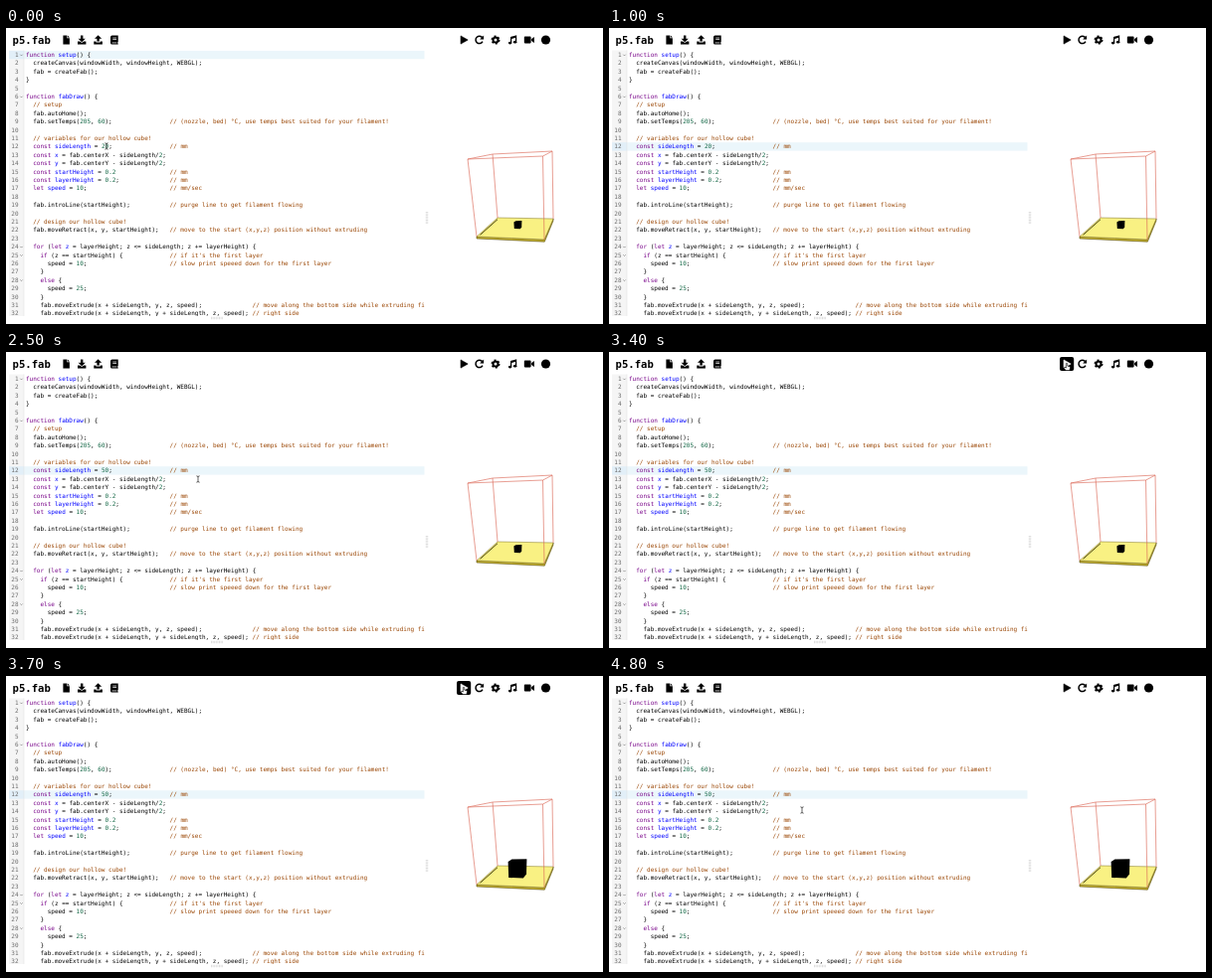
An HTML page that plays this animation: 600 px wide and 298 px high, repeating every 4.9 s.

```html
<!DOCTYPE html>
<html lang="en">
<head>
<meta charset="utf-8">
<title>p5.fab editor</title>
<style>
  html, body { margin: 0; width: 100%; height: 100%; overflow: hidden; background: #fff; }
  svg { display: block; width: 100%; height: 100%; }
  text { white-space: pre; font: 6px "DejaVu Sans Mono", "Liberation Mono", monospace; }
  .title { font-size: 10.6px; font-weight: bold; }
  .num { fill: #6c6c6c; text-anchor: end; }
  .keyword { fill: #708; }
  .def { fill: #00f; }
  .number { fill: #164; }
  .comment { fill: #940; }
  .line { fill: none; stroke: #000; stroke-width: 1.5; }
  .wire { fill: none; stroke: #dc6a58; stroke-width: .65; stroke-linejoin: round; }
</style>
</head>
<body>
<svg viewBox="0 0 600 298">
  <defs>
    <clipPath id="pane"><rect x="3" y="22.5" width="417.5" height="267.5"/></clipPath>
  </defs>

  <text class="title" x="6.6" y="15.5">p5.fab</text>
  <g id="fileIcons">
    <path d="M57.4 7.6h3.9v2.6h2.6v6.2h-6.5zM61.9 7.6l2 2h-2z"/>
    <path d="M75 7.6h2.4v3.2h2.4l-3.6 3.4-3.6-3.4H75zM72 13.4h2.2l2 1.7 2-1.7h2.2v3H72z"/>
    <path d="M91.4 13.6h2.4v-2.9h2.4l-3.6-3.4-3.6 3.4h2.4zM88.3 13.4h2.2v1h4.2v-1h2.2v3h-8.6z"/>
    <path d="M106.6 7.6h6.1v6.6h-.5v1.3h.5v1h-6.1q-1.6 0-1.6-1.6V9.2q0-1.6 1.6-1.6z"/>
    <path d="M107.3 10h3.8M107.3 11.5h3.8M106.6 14.9h4.8" stroke="#fff" stroke-width=".7"/>
  </g>

  <rect id="playBox" x="453" y="5" width="14.2" height="14" rx="2"/>
  <path id="play" d="M457 7.9L464.2 12L457 16.1z" stroke-width=".6" stroke-linejoin="round"/>
  <path class="line" d="M478.8 9.8A3.7 3.7 0 1 0 479 13.7"/>
  <path d="M480.1 7.5v4h-4z"/>
  <g transform="translate(492 12)">
    <circle r="2.5" fill="none" stroke="#000" stroke-width="2"/>
    <circle r="3.7" fill="none" stroke="#000" stroke-width="1.6" stroke-dasharray="1.94"/>
  </g>
  <path d="M507 8.9l6.2-1.7v7.2h-1.2v-4.6l-3.8 1.1v4.4H507z"/>
  <ellipse cx="506.6" cy="15.1" rx="1.7" ry="1.4"/>
  <ellipse cx="511.6" cy="14.2" rx="1.7" ry="1.4"/>
  <path d="M521.6 8.6h5.2q.8 0 .8.8v5.2q0 .8-.8.8h-5.2q-.8 0-.8-.8V9.4q0-.8.8-.8zM528.1 10.9l2.8-1.9v6l-2.8-1.9z"/>
  <circle cx="542.5" cy="12" r="4.6"/>

  <g clip-path="url(#pane)">
    <rect x="3" y="22" width="15" height="270" fill="#f5f5f5"/>
    <g id="active">
      <rect x="3" width="15" height="8.4" fill="#e2eff8"/>
      <rect x="18" width="403" height="8.4" fill="#ebf6fb"/>
    </g>
    <path d="M18 22V291" stroke="#ddd" stroke-width=".5"/>
    <g id="flash" fill="#ff5a00"></g>
    <g id="code"></g>
  </g>
  <path d="M206 291.3h12M206 292.7h12M422.3 185v12M423.7 185v12" stroke="#bbb" stroke-width=".6" stroke-dasharray="1 .6"/>

  <g id="printer">
    <path d="M473 210L541 213L550 192V194L541.3 215.2L473 212z" fill="#c9b52e" stroke="#55490f" stroke-width=".6"/>
    <path d="M473 210L494 191L550 192L541 213z" fill="#f9f183" stroke="#7d7020" stroke-width=".5"/>
    <path d="M476.5 208.3L494 192.7" stroke="#4a4312" stroke-width="1"/>
    <path class="wire" d="M464 132L489 127L549 124L539.5 129zM464 132L473 210M489 127L494 191M549 124L550 192M539.5 129L541 213"/>
    <path id="cube"/>
  </g>

  <g id="cursor">
    <path id="beam" d="M-1.6-3.2Q0-3.2 0-2.2Q0-3.2 1.6-3.2M0-2.4V2.4M-1.6 3.2Q0 3.2 0 2.2Q0 3.2 1.6 3.2" fill="none" stroke="#222" stroke-width=".7"/>
    <path id="arrow" d="M0 0V7L1.6 5.5L2.7 8L3.8 7.5L2.7 5.1H4.9z" stroke="#fff" stroke-width=".5"/>
    <path id="hand" d="M-.7-2.5Q0-3.3.7-2.5V.1L3.1.7Q3.7 1 3.5 2L2.8 4.6H-.9L-3 1.9Q-2.8.9-1.7 1.4L-.7 2z" fill="#fff" stroke="#000" stroke-width=".6"/>
  </g>
</svg>
<script>
const LOOP = 4900, STEP = 100;
const CHAR = 3.612, PITCH = 8.4, LEFT = 20, TOP = 22.8;
const EDIT_LINE = 12;

const byId = id => document.getElementById(id);
const show = (id, on) => byId(id).style.display = on ? "" : "none";
const note = (code, comment, column = 40) => code.padEnd(column) + "// " + comment;

const sideLine = value => note(`  const sideLength = ${value};`, "mm");

const lines = [
  "function setup() {",
  "  createCanvas(windowWidth, windowHeight, WEBGL);",
  "  fab = createFab();",
  "}",
  "",
  "function fabDraw() {",
  "  // setup",
  "  fab.autoHome();",
  note("  fab.setTemps(205, 60);", "(nozzle, bed) °C, use temps best suited for your filament!"),
  "  ",
  "  // variables for our hollow cube!",
  sideLine("20"),
  "  const x = fab.centerX - sideLength/2;",
  "  const y = fab.centerY - sideLength/2;",
  note("  const startHeight = 0.2", "mm"),
  note("  const layerHeight = 0.2;", "mm"),
  note("  let speed = 10;", "mm/sec"),
  "",
  note("  fab.introLine(startHeight);", "purge line to get filament flowing"),
  "",
  "  // design our hollow cube!",
  note("  fab.moveRetract(x, y, startHeight);", "move to the start (x,y,z) position without extruding"),
  "",
  "  for (let z = layerHeight; z <= sideLength; z += layerHeight) {",
  note("    if (z == startHeight) {", "if it's the first layer"),
  note("      speed = 10;", "slow print speeed down for the first layer"),
  "    }",
  "    else {",
  "      speed = 25;",
  "    }",
  note("    fab.moveExtrude(x + sideLength, y, z, speed);", "move along the bottom side while extruding filament", 63),
  note("    fab.moveExtrude(x + sideLength, y + sideLength, z, speed);", "right side", 63)
];

function highlight(source) {
  const token = /(\/\/.*)|\b(function|const|let|for|if|else)\b|\b(\d[\d.]*)|(\w+)|[^\w/]+|\//g;
  let declares = false;
  return source.replace(token, (text, comment, keyword, number, word) => {
    const kind = comment ? "comment" : keyword ? "keyword" : number ? "number" : word && declares ? "def" : "";
    if (text.trim()) declares = /^(function|const|let)$/.test(text);
    const safe = text.replace(/</g, "&lt;");
    return kind ? `<tspan class="${kind}">${safe}</tspan>` : safe;
  });
}

byId("code").innerHTML = lines.map((source, i) => {
  const y = TOP + i * PITCH + 6.2;
  const fold = /^(function|.*(for|if) \(|.*else)/.test(source)
    ? `<path d="M14.3 ${y - 2.3}l1.2 1.2l1.2-1.2" fill="none" stroke="#666" stroke-width=".6"/>` : "";
  return `<text class="num" x="12.6" y="${y}">${i + 1}</text>${fold}` +
    `<text id="line${i + 1}" x="${LEFT}" y="${y}">${highlight(source)}</text>`;
}).join("");

byId("flash").innerHTML = lines.map((source, i) =>
  `<rect x="${LEFT}" y="${TOP + i * PITCH + .6}" width="${source.length * CHAR}" height="7.4"/>`
).join("");

const SMALL_CUBE = "M510.4 195.4L512.3 194.2L518.4 194L518.2 200.4L516.8 202.2L510.8 202z";
const LARGE_CUBE = "M504.6 187L508.4 184.4L523.4 184.2L523 199.6L519.8 203.4L505.2 203z";

// Pointer stops: time, x, y
const stops = [
  [0, 101, 119], [1900, 101, 119], [2400, 193, 128], [2500, 193, 128],
  [3100, 460, 14], [4200, 460, 14], [4700, 194, 135], [LOOP, 194, 135]
];

function pointerAt(t) {
  const next = stops.findIndex(stop => stop[0] > t);
  const [t0, x0, y0] = stops[next - 1], [t1, x1, y1] = stops[next];
  const u = (t - t0) / (t1 - t0), ease = u * u * (3 - 2 * u);
  return [x0 + (x1 - x0) * ease, y0 + (y1 - y0) * ease];
}

let shownValue = "20";

function draw(time) {
  const t = Math.floor(time % LOOP / STEP) * STEP;
  const [x, y] = pointerAt(t);
  const hover = x > 453 && x < 467 && y < 19;
  const editing = x < 420 && y > 22;

  const row = t < 300 ? 0 : EDIT_LINE - 1;
  byId("active").setAttribute("transform", `translate(0 ${TOP + row * PITCH})`);

  const value = t < 1300 ? "20" : t < 1700 ? "0" : "50";
  if (value !== shownValue) {
    byId("line" + EDIT_LINE).innerHTML = highlight(sideLine(value));
    shownValue = value;
  }

  show("flash", t >= 3500 && t < 3700);
  byId("cube").setAttribute("d", t < 3500 ? SMALL_CUBE : LARGE_CUBE);

  show("playBox", hover);
  byId("play").setAttribute("fill", hover ? "#fff" : "#000");
  byId("play").setAttribute("stroke", hover ? "#fff" : "#000");

  show("cursor", t < 600 || t >= 1900);
  show("beam", editing);
  show("hand", hover);
  show("arrow", !editing && !hover);
  byId("cursor").setAttribute("transform", `translate(${x} ${y})`);
}

const start = performance.now();
function tick() {
  draw(performance.now() - start);
  requestAnimationFrame(tick);
}
tick();
</script>
</body>
</html>
```
